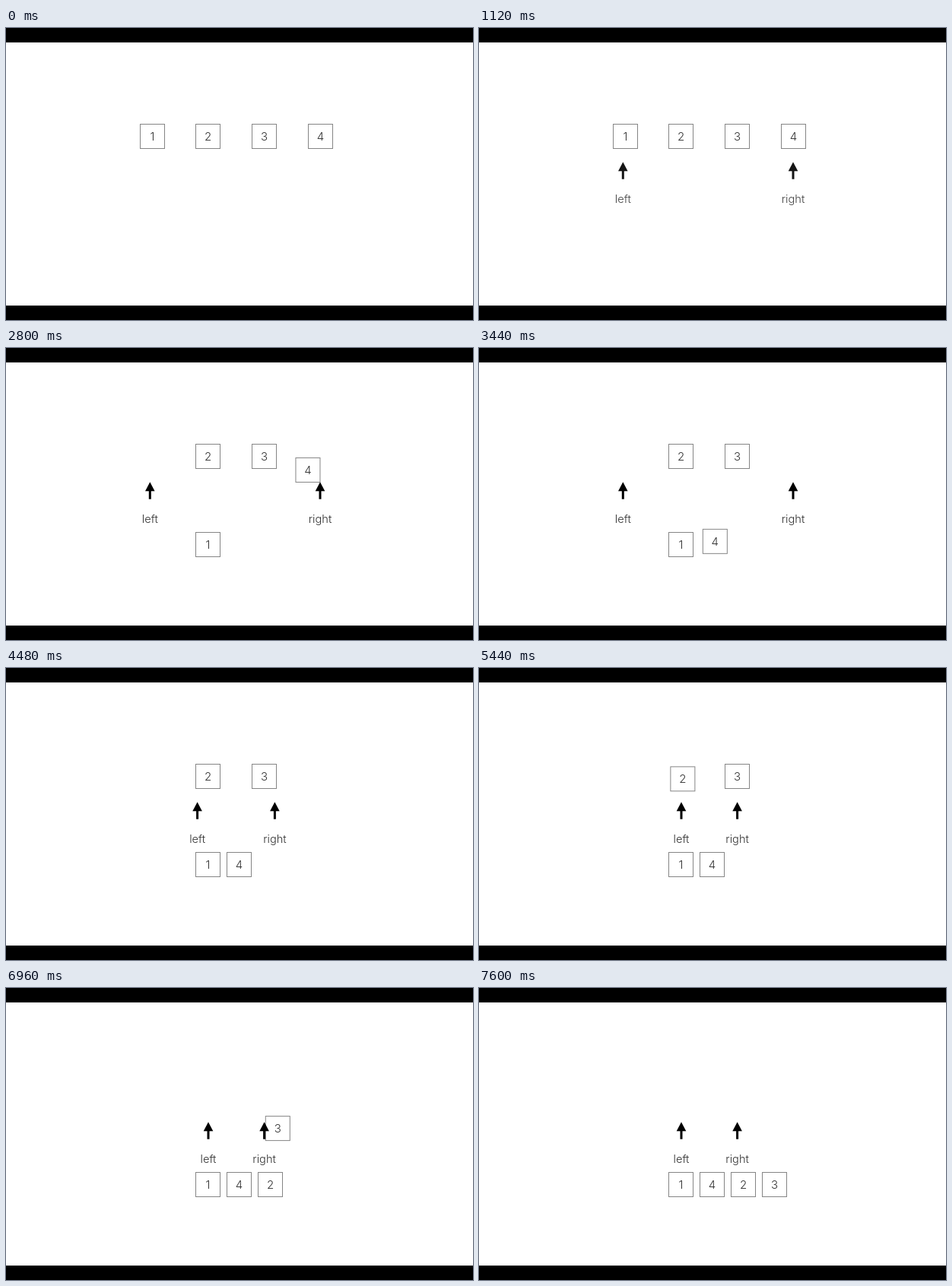
Animation of 614 by 384 pixels, one loop 8800 ms. Source, as an HTML page:

```html
<!DOCTYPE html>
<html lang="en">
<head>
<meta charset="utf-8">
<title>Two pointers</title>
<style>
  html, body { margin: 0; width: 100%; height: 100%; overflow: hidden; background: #fff; }
  svg { display: block; width: 100%; height: 100%; }
  text { font: 300 15px Inter, "Noto Sans", sans-serif; fill: #333; text-anchor: middle; }
  .label { font-size: 14.6px; }
  rect.box { fill: none; stroke: #858585; stroke-width: 1; }
</style>
</head>
<body>
<svg id="stage" viewBox="0 0 614 384">
  <rect width="614" height="19"/>
  <rect y="365" width="614" height="19"/>
</svg>
<script>
const LOOP = 8800, MOVE = 1030, TOP = 126.5, BOTTOM = 242.5;
const stage = document.getElementById('stage');

// start: when the part begins to move from x to endX
const boxes = [
  { name: 1, x: 176.5, endX: 249.5, start: 1316 },
  { name: 2, x: 249.5, endX: 331.5, start: 5328 },
  { name: 3, x: 323.5, endX: 372.5, start: 6536 },
  { name: 4, x: 397.5, endX: 290.5, start: 2535 }
];
const pointers = [
  { name: 'left', x: 189.3, endX: 266, start: 3744 },
  { name: 'right', x: 413, endX: 339.6, start: 3744 }
];

function addGroup(markup) {
  const g = document.createElementNS('http://www.w3.org/2000/svg', 'g');
  g.innerHTML = markup;
  stage.append(g);
  return g;
}

for (const b of boxes)
  b.el = addGroup(`<rect class="box" width="32" height="32"/><text x="16" y="21.5">${b.name}</text>`);
for (const p of pointers)
  p.el = addGroup(`<path d="M0 176.3L6.3 188.3H1.5V198.7H-1.5V188.3H-6.3Z"/>
    <text class="label" y="229.7">${p.name}</text>`);

const progress = (t, start, length) => Math.min(1, Math.max(0, (t - start) / length));
const ease = u => (1 - Math.cos(Math.PI * u)) / 2;

function place(part, t, y, endY) {
  const u = ease(progress(t, part.start, MOVE));
  const x = part.x + (part.endX - part.x) * u;
  part.el.setAttribute('transform', `translate(${x} ${y + (endY - y) * u})`);
}

function draw(now) {
  const t = now % LOOP;
  for (const b of boxes) place(b, t, TOP, BOTTOM);
  for (const p of pointers) {
    place(p, t, 0, 0);
    p.el.setAttribute('opacity', progress(t, 260, 940));
  }
}

let began;
function tick(now) {
  began ??= now;
  draw(now - began);
  requestAnimationFrame(tick);
}
draw(0);
requestAnimationFrame(tick);
</script>
</body>
</html>
```
